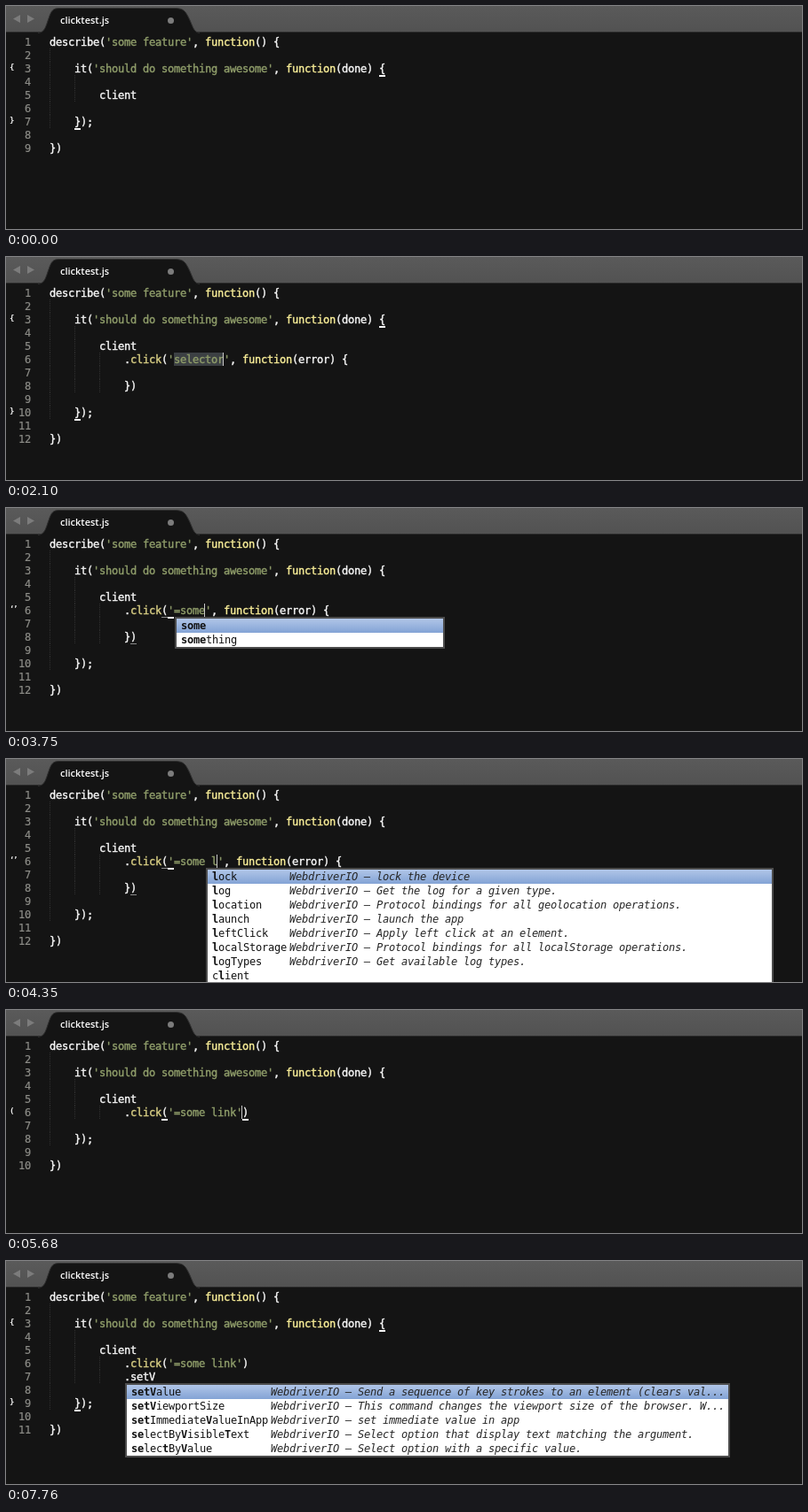
An HTML page with a canvas that plays this animation: 896 px wide and 252 px high, repeating every 8 s.

```html
<!DOCTYPE html>
<html lang="en">
<head>
<meta charset="utf-8">
<title>Editor autocompletion</title>
<style>
  html, body { margin: 0; width: 100%; height: 100%; overflow: hidden; background: #141414; }
  canvas { display: block; }
</style>
</head>
<body>
<canvas id="stage" width="896" height="252"></canvas>
<script>
const ctx = document.getElementById('stage').getContext('2d', { alpha: false });
const LOOP = 8000, CHAR = 7, LINE = 15, LEFT = 49;
const MONO = '"DejaVu Sans Mono", monospace';
const colX = col => LEFT + col * CHAR;
const rowY = row => 18 + row * LINE;

// ---- document ----
const head = ["describe('some feature', function() {", '',
  "    it('should do something awesome', function(done) {", '', '        client'];
const tail = ['', '    });', '', '})'];
const pad = ' '.repeat(12);
const callback = selector => [`${pad}.click('${selector}', function(error) {`, '', pad + '})'];
const linkCall = pad + ".click('=some link')";

// ---- bracket marks: [row, col, dim] and gutter icons: [row, text] ----
const braces = end => ({ marks: [[3, 53], [end, 4]], icons: [[3, '{'], [end, '}']] });
const quoteIcon = [[6, '‘’']];
const quotes = n => ({
  marks: [[6, 19], [6, 20 + n], [6, 18, true], [8, 13, true]], icons: quoteIcon
});

// ---- popups: items are "name|hint|hint x", asterisks toggle bold ----
const popup = (row, col, right, selected, items, thumb) => ({ row, col, right, selected, items, thumb });
const io = text => 'WebdriverIO – ' + text;
const clickHint = io('Click on an element based on the given selector.');
const consoleItems = ['table', 'time', 'timeStamp', 'trace', 'warn'].map(m => `*c*onsole|console.${m}()`);
const cPopup = popup(6, 13, 713, 7, [...consoleItems,
  '*c*ontext|' + io('list all available contexts') + '|196', '*c*lient',
  '*c*loseApp|' + io('close the app')], [204, 38]);
const clPopup = popup(6, 13, 745, 0, [
  '*cl*ick|' + clickHint, '*cl*ient', '*cl*oseApp|' + io('close the app'),
  '*cl*ose|' + io('Close the current window.'),
  '*cl*earElement|' + io('Clear a textarea or text input element’s value.'),
  '*c*onso*l*e|console.clear()', '*c*onso*l*e|console.log()', '*c*onso*l*e|console.table()']);
const cliPopup = popup(6, 13, 731, 0, ['*cli*ck|' + clickHint, '*cli*ent',
  '*cl*earElement|' + io('Clear an input element’s value.')]);
const soPopup = popup(6, 21, 867, 0, ['*so*me', '*so*mething',
  '*s*cr*o*ll|' + io('Scroll to a specific element.'),
  '*s*etC*o*okie|' + io('Sets a cookie for current page.'),
  '*s*essi*o*n|' + io('Protocol bindings for all session operations.'),
  '*s*etGe*o*Location|' + io('set the current geo location'),
  '*s*etOrientati*o*n|' + io('set the device orientation'),
  '*s*ubmitF*o*rm|' + io('Submits a form found on the page.')]);
const somPopup = popup(6, 21, 494, 0, ['*som*e', '*som*ething']);
const somePopup = popup(6, 21, 494, 0, ['*some*', '*some*thing']);
const lPopup = popup(6, 26, 864, 0, [
  '*l*ock|' + io('lock the device'), '*l*og|' + io('Get the log for a given type.'),
  '*l*ocation|' + io('Protocol bindings for all geolocation operations.'),
  '*l*aunch|' + io('launch the app'), '*l*eftClick|' + io('Apply left click at an element.'),
  '*l*ocalStorage|' + io('Protocol bindings for all localStorage operations.'),
  '*l*ogTypes|' + io('Get available log types.'), 'c*l*ient']);
const liPopup = popup(6, 26, 808, 0, [
  '*l*eftCl*i*ck|' + io('Apply left click at an element.'),
  '*l*ocat*i*on|' + io('Protocol bindings for all geolocation operations.'), 'c*li*ent']);
const linPopup = popup(6, 26, 808, 0,
  ['*l*ocat*i*o*n*|' + io('Protocol bindings for all geolocation operations.')]);
const valueHint = io('Send a sequence of key strokes to an element (clears val...');
const viewHint = io('This command changes the viewport size of the browser. W...');
const setItems = q => [
  ['Cookie', io('Sets a cookie for current page.')],
  ['GeoLocation', io('set the current geo location')],
  ['ImmediateValue', io('set immediate value in app')],
  ['ImmediateValueInApp', io('set immediate value in app')],
  ['Orientation', io('set the device orientation')],
  ['Value', valueHint], ['ViewportSize', viewHint]
].map(([name, hint]) => `*${q}*${'set'.slice(q.length)}${name}|${hint}`);
const setVPopup = popup(7, 13, 815, 0, [
  '*setV*alue|' + valueHint, '*setV*iewportSize|' + viewHint,
  '*set*Immediate*V*alueInApp|' + io('set immediate value in app'),
  '*se*lectBy*V*isible*T*ext|' + io('Select option that display text matching the argument.'),
  '*se*lec*t*By*V*alue|' + io('Select option with a specific value.')]);

// ---- timeline: [start, inner lines, caret [row, col], extras] ----
const dot = text => [pad + '.' + text];
const set = text => [linkCall, pad + '.' + text];
const selectWord = { select: [[6, 20, 28]] };
const linkMarks = { marks: [[6, 18], [8, 13]], icons: [[6, '('], [8, ')']] };
const steps = [
  [0, [], null, braces(7)],
  [150, [], [5, 14], braces(7)],
  [300, [' '.repeat(8)], [6, 8], braces(8)],
  [600, [pad], [6, 12], braces(8)],
  [750, dot(''), [6, 13], braces(8)],
  [1200, dot('c'), [6, 14], braces(8)],
  [1350, dot('c'), [6, 14], braces(8), cPopup],
  [1650, dot('cl'), [6, 15], braces(8), clPopup],
  [1800, dot('cli'), [6, 16], braces(8), cliPopup],
  [2100, callback('selector'), [6, 28], { ...braces(10), ...selectWord }],
  [2550, callback('selector'), [6, 28], selectWord],
  [2700, callback('selector'), [6, 28], { ...selectWord, marks: [[6, 19], [6, 28]], icons: quoteIcon }],
  [3150, callback('='), [6, 21], quotes(1)],
  [3450, callback('=so'), [6, 23], quotes(3), soPopup],
  [3600, callback('=som'), [6, 24], quotes(4), somPopup],
  [3750, callback('=some'), [6, 25], quotes(5), somePopup],
  [3900, callback('=some '), [6, 26], quotes(6)],
  [4200, callback('=some l'), [6, 27], quotes(7)],
  [4350, callback('=some l'), [6, 27], quotes(7), lPopup],
  [4500, callback('=some li'), [6, 28], quotes(8), liPopup],
  [4640, callback('=some lin'), [6, 29], quotes(9), linPopup],
  [4790, callback('=some link'), [6, 30], quotes(10)],
  [5090, callback('=some link'), [6, 31], linkMarks],
  [5240, callback('=some link'), [7, 0], { ...linkMarks, select: [[6, 31, 51]] }],
  [5390, callback('=some link'), [8, 13], { ...linkMarks, select: [[6, 31, 51], [7, 0, 1], [8, 0, 13]] }],
  [5680, [linkCall], [6, 31], { marks: [[6, 18], [6, 31]], icons: [[6, '(']] }],
  [5980, [linkCall], [6, 32], { icons: [[6, '(']] }],
  [6120, [linkCall], [6, 32], {}],
  [6420, [linkCall, pad], [7, 12], {}],
  [6570, [linkCall, pad], [7, 12], braces(9)],
  [6720, set(''), [7, 13], braces(9)],
  [7020, set('s'), [7, 14], braces(9)],
  [7170, set('se'), [7, 15], braces(9), popup(7, 13, 815, 0, setItems('se'))],
  [7310, set('set'), [7, 16], braces(9), popup(7, 13, 815, 0, setItems('set'))],
  [7610, set('setV'), [7, 17], braces(9), popup(7, 13, 815, 0, setItems('set'))],
  [7760, set('setV'), null, braces(9), setVPopup]
];

// ---- drawing ----
function box(color, x, y, w, h) {
  ctx.fillStyle = color;
  ctx.fillRect(x, y, w, h);
}

// Fixed-pitch text; weight thickens light glyphs. Returns the end x.
function type(text, x, y, color, style = '', weight = 0) {
  ctx.font = `${style} 12px ${MONO}`;
  ctx.fillStyle = ctx.strokeStyle = color;
  ctx.lineWidth = weight;
  for (const ch of text) {
    if (ch !== ' ') {
      ctx.fillText(ch, x, y);
      if (weight) ctx.strokeText(ch, x, y);
    }
    x += CHAR;
  }
  return x;
}

function drawHeader() {
  const bar = ctx.createLinearGradient(0, 0, 0, 30);
  bar.addColorStop(0, '#5a5a5a');
  bar.addColorStop(1, '#525252');
  box(bar, 0, 0, 896, 30);
  box('#2c2c2c', 0, 29, 896, 1);
  const tab = new Path2D('M36 30.5C44 30 45 22 48 14C51 5 53 2.5 60 2.5H190C200 2.5 202 6 206 14C210 22 211 30 218 30.5');
  ctx.fillStyle = '#141414';
  ctx.fill(tab);
  ctx.strokeStyle = '#303030';
  ctx.lineWidth = 1;
  ctx.stroke(tab);
  ctx.fillStyle = '#7c7c7c';
  ctx.fill(new Path2D('M16 10V19L8 14.5ZM24 10V19L32 14.5Z'));
  ctx.beginPath();
  ctx.arc(185.5, 16.5, 3.5, 0, 7);
  ctx.fill();
  ctx.font = '600 11px "Open Sans", sans-serif';
  ctx.fillStyle = '#fff';
  ctx.fillText('clicktest.js', 61, 20);
}

function drawGuides(lines) {
  let indent = 0;
  for (let i = lines.length - 1; i >= 0; i--) {
    if (lines[i]) indent = lines[i].search(/\S|$/);
    for (let col = 0; col < indent; col += 4)
      for (let y = 0; y < LINE; y += 2) box('#303030', colX(col), rowY(i + 1) + y, 1, 1);
  }
}

function drawCode(line, row) {
  const y = rowY(row) + 12;
  type(String(row).padStart(2), 14, y, '#8b8b86', '', 0.2);
  let x = LEFT;
  for (const part of line.split(/('[^']*'|function|click(?=\())/)) {
    const color = part[0] === "'" ? '#8f9d6a' : part === 'function' ? '#f9ee98'
      : part === 'click' ? '#dad085' : '#f8f8f8';
    x = type(part, x, y, color, '', 0.4);
  }
}

function drawPopup({ row, col, right, selected, items, thumb }) {
  const left = colX(col) - 6, top = rowY(row + 1), textX = left + 7;
  const nameLength = item => item.split('|')[0].replaceAll('*', '').length;
  const hintX = textX + Math.max(...items.map(nameLength)) * CHAR + 3;
  box('#4c4c4c', left, top, right - left, items.length * 16 + 4);
  box('#fff', left + 2, top + 2, right - left - 4, items.length * 16);
  items.forEach((item, i) => {
    const y = top + 2 + i * 16;
    if (i === selected) {
      const blue = ctx.createLinearGradient(0, y, 0, y + 16);
      blue.addColorStop(0, '#b1c6e8');
      blue.addColorStop(1, '#83a3d5');
      box(blue, left + 2, y, right - left - 4, 16);
    }
    const [name, hint = '', x] = item.split('|');
    let nameX = textX;
    name.split('*').forEach((part, n) => {
      nameX = type(part, nameX, y + 12, '#111', n % 2 ? 'bold' : '');
    });
    const start = hint.startsWith('console.') ? right - 6 - hint.length * CHAR : +x || hintX;
    type(hint, start, y + 12, '#262626', 'italic');
  });
  if (thumb) {
    ctx.fillStyle = '#858585';
    ctx.beginPath();
    ctx.roundRect(702, thumb[0], 7, thumb[1], 3.5);
    ctx.fill();
  }
}

function draw(time) {
  const [, inner, caret, { marks = [], icons = [], select = [] }, list] =
    steps.findLast(step => step[0] <= time);
  const lines = [...head, ...inner, ...tail];
  box('#141414', 0, 0, 896, 252);
  drawHeader();
  for (const [row, from, to] of select)
    box('#3c4043', colX(from), rowY(row), (to - from) * CHAR, LINE);
  drawGuides(lines);
  lines.forEach((line, i) => drawCode(line, i + 1));
  for (const [row, col, dim] of marks)
    box(dim ? '#8a8a8a' : '#f8f8f8', colX(col), rowY(row + 1), CHAR, dim ? 1 : 2);
  for (const [row, icon] of icons) {
    ctx.font = `bold 9px ${MONO}`;
    ctx.fillStyle = '#f0f0f0';
    [...icon].forEach((ch, i) => ctx.fillText(ch, 4 + i * 4, rowY(row) + 9));
  }
  if (caret) box('#c8c8c8', colX(caret[1]) - 1, rowY(caret[0]), 1, LINE);
  if (list) drawPopup(list);
}

function tick() {
  draw(performance.now() % LOOP);
  requestAnimationFrame(tick);
}
tick();
</script>
</body>
</html>
```
